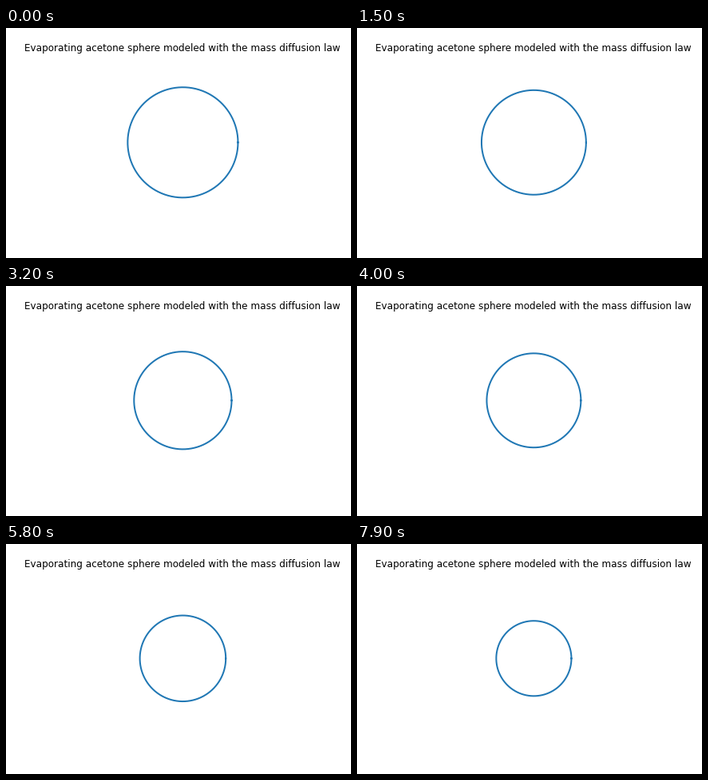
These frames come from a looping animation (432x288 px, 8000 ms). A matplotlib script:

```python
import numpy as np
import matplotlib.pyplot as plt
from matplotlib.animation import FuncAnimation

FRAMES, INTERVAL = 80, 100
R0_SQ = 4770.0   # initial squared radius, px^2
RATE = 323.5     # loss of squared radius, px^2 per second
WIDTH = 334.8    # axes width, px

plt.rcParams["font.family"] = "DejaVu Sans"
fig = plt.figure(figsize=(6, 4), dpi=72, facecolor="white")
ax = fig.add_axes([0.125, 0.11, 0.775, 0.77])
ax.set_axis_off()

# One data unit equals one pixel, origin at the sphere's centre.
ax.set_xlim(-WIDTH / 2, WIDTH / 2)
ax.set_ylim(-113.04, 108.72)
ax.set_title("Evaporating acetone sphere modeled with the mass diffusion law",
             fontsize=12, x=0.5 - 1 / WIDTH)

theta = np.linspace(0, 2 * np.pi, 100)
outline, = ax.plot([], [], color="#1f77b4", lw=2)


def radius(t):
    """D-squared law: the squared radius shrinks linearly with time."""
    return np.sqrt(R0_SQ - RATE * t)


def update(i):
    r = radius(i * INTERVAL / 1000)
    outline.set_data(r * np.cos(theta), r * np.sin(theta))
    return outline,


anim = FuncAnimation(fig, update, frames=FRAMES, interval=INTERVAL,
                     repeat=True, repeat_delay=0)
plt.show()
```
